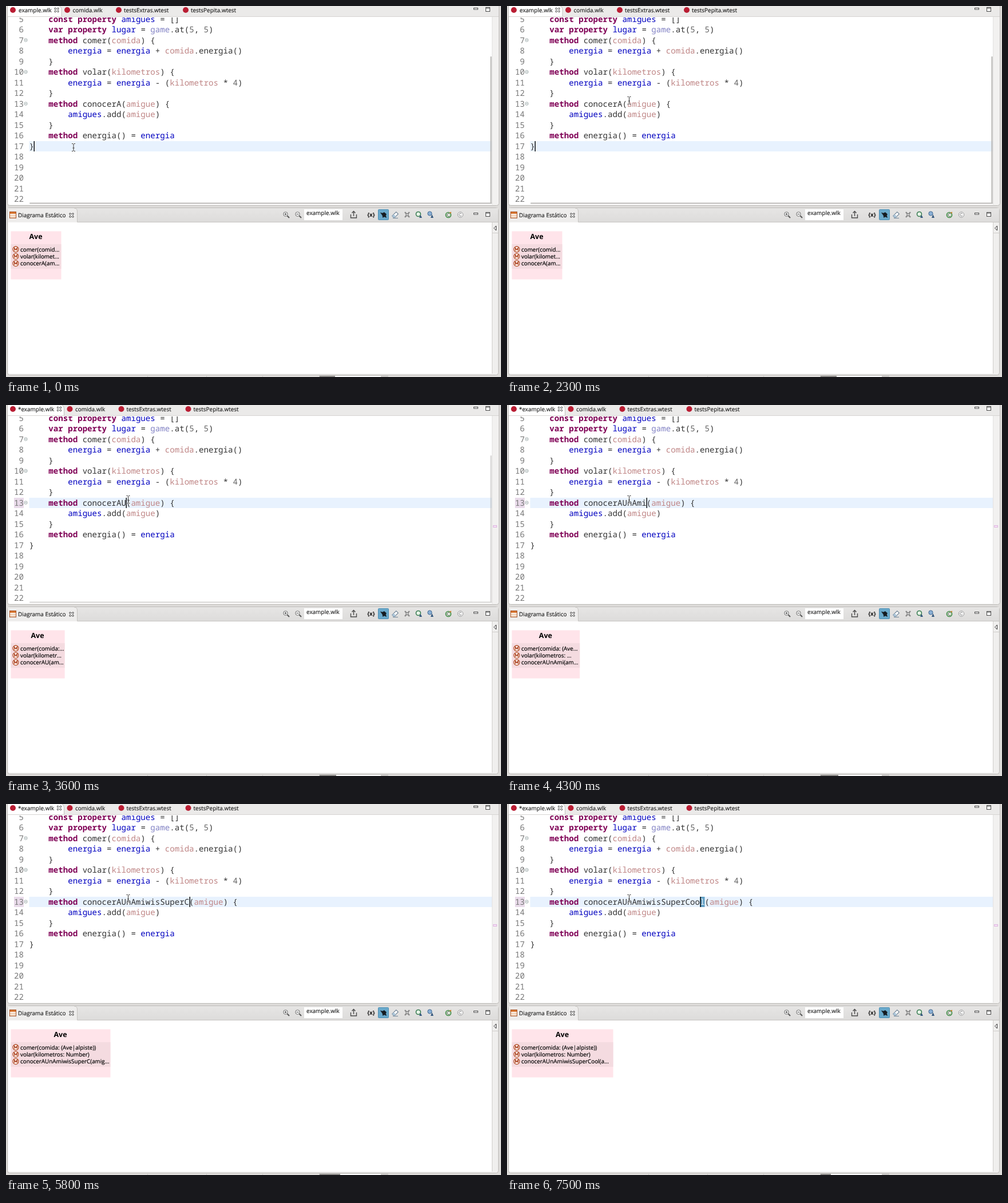
Recreate the animation shown at these times as an HTML page. Size 865 by 648 pixels, loop 8000 ms.

```html
<!DOCTYPE html>
<html lang="es">
<head>
<meta charset="utf-8">
<title>Editor</title>
<style>
  html, body { margin: 0; width: 100%; height: 100%; overflow: hidden; background: #dfdddb; }
  svg { display: block; width: 865px; height: 648px; }
  text { white-space: pre; text-rendering: geometricPrecision; }
  .code { font: 14.13px "Noto Sans Mono", "DejaVu Sans Mono", monospace; fill: #333; }
  .ui { font: 9.95px "Open Sans", "Noto Sans", sans-serif; fill: #1c1c1c; stroke: #1c1c1c; stroke-width: .15; }
  .ui circle { stroke: none; }
  .row { font: 9.85px "Open Sans", "Noto Sans", sans-serif; fill: #000; stroke: #000; stroke-width: .2; }
  .bold { font-weight: 700; stroke: none; }
  .kw { fill: #7f0055; font-weight: 700; }
  .field { fill: #0000c0; }
  .param { fill: #bf8585; }
  .obj { fill: #8282c4; }
  .num { fill: #666; }
  .ln { fill: #787878; text-anchor: end; }
  .line { fill: none; stroke: #4a4a4a; }
</style>
</head>
<body>
<svg viewBox="0 0 865 648">
  <defs>
    <clipPath id="page"><rect x="4" y="20" width="845" height="326"/></clipPath>
    <linearGradient id="bar" x2="0" y2="1"><stop stop-color="#e6e5e4"/><stop offset="1" stop-color="#dddcdb"/></linearGradient>
    <g id="close" class="line">
      <path d="M-3.5-3.5h2l1.5 2 1.5-2h2v2l-2 1.5 2 1.5v2h-2l-1.5-2-1.5 2h-2v-2l2-1.5-2-1.5z"/>
    </g>
    <g id="winBtns" class="line">
      <rect x="817.5" y="3.5" width="7" height="2.5" fill="#fff"/>
      <rect x="838.5" y="2.5" width="7" height="7" fill="#fff"/><path d="M838 4h8"/>
    </g>
    <g id="zoom">
      <path d="M2 2l3.5 3.5" stroke="#555" stroke-width="2"/>
      <circle cx="-1" cy="-1" r="3.7" fill="#fff" stroke="#666"/>
    </g>
    <g id="method">
      <circle r="5" fill="#fff4ee" stroke="#b4512c" stroke-width="1.3"/>
      <path d="M-2.4 2.6v-5l2.4 3.2 2.4-3.2v5" fill="none" stroke="#a83c1c" stroke-width="1.3"/>
    </g>
    <path id="beam" d="M-3-6.5h2l1 1 1-1h2M0-5.5V5.5M-3 6.5h2l1-1 1 1h2M-1.5 1h3"/>
  </defs>

  <!-- editor -->
  <rect x="2.5" y="-6" width="859" height="354.5" rx="4" fill="#f2f1f0" stroke="#bdbbb8"/>
  <rect x="3" y="0" width="858" height="18" fill="#ebeae9"/>
  <path id="tab" fill="#fff"/>
  <path id="tabEdge" fill="none" stroke="#c2c0bd"/>
  <path d="M3 18.5H861" stroke="#d6d4d2"/>
  <rect x="4" y="19" width="845" height="328" fill="#fff"/>
  <path d="M849.5 19V347" stroke="#e3e2e1"/>
  <circle cx="12" cy="7" r="5" fill="#b91d33"/>
  <text id="title" class="ui" y="10.5"></text>
  <use id="tabClose" href="#close" y="7"/>
  <g id="tabs" class="ui">
    <circle cx="107" cy="7" r="5" fill="#b91d33"/><text x="116.5" y="10.5">comida.wlk</text>
    <circle cx="197" cy="7" r="5" fill="#b91d33"/><text x="206" y="10.5">testsExtras.wtest</text>
    <circle cx="314" cy="7" r="5" fill="#b91d33"/><text x="323" y="10.5">testsPepita.wtest</text>
  </g>
  <use href="#winBtns"/>
  <g clip-path="url(#page)">
    <rect id="current" x="40.5" width="808.5" height="18" fill="#e8f2fe"/>
    <rect id="changed" x="14" y="162" width="17" height="18" fill="#e9dbea"/>
    <g id="code" class="code"></g>
    <g id="pick" class="code">
      <rect x="337" y="162" width="8.5" height="18" fill="#5f9fc4"/>
      <text x="337.1" y="175.6" style="fill:#e8f2fa">l</text>
    </g>
    <rect id="caret" width="1.5" height="18" fill="#111"/>
  </g>
  <rect id="mark" x="851.5" y="210.5" width="6" height="3" fill="#f7e3f7" stroke="#ddb3df"/>
  <g id="scroll" fill="#bbb9b7">
    <rect x="41" y="343.4" width="808" height="2.2" rx="1.1"/>
    <rect x="846.4" y="88" width="2.2" height="257" rx="1.1"/>
  </g>
  <g id="mouse" fill="none">
    <use href="#beam" stroke="#fff" stroke-width="2.4" opacity=".7"/>
    <use href="#beam" stroke="#333"/>
  </g>

  <!-- diagram view -->
  <rect x="2.5" y="352.5" width="858" height="292" rx="4" fill="#f0efee" stroke="#bdbbb8"/>
  <rect x="3" y="353" width="857" height="24" fill="url(#bar)"/>
  <path d="M3 377V356q0-3 3-3H119q5 0 5.5 5V377z" fill="#eeedec"/>
  <path d="M119 353q5 0 5.5 5V377.5H860" fill="none" stroke="#c6c4c1"/>
  <rect x="4" y="378" width="846" height="264" fill="#fff"/>
  <path d="M849.5 378V642M850 396.5H860" stroke="#d0cecb"/>
  <path d="M856.5 384v8l-4-4z" fill="#fff" stroke="#333"/>
  <rect x="6.5" y="359.5" width="11" height="11" fill="#fff" stroke="#a8562a"/>
  <path d="M7 361.5h10" stroke="#d8752f" stroke-width="3"/>
  <path d="M7 365.5h10M7 368.5h10" stroke="#e09a60"/>
  <text class="ui" x="21" y="368.7">Diagrama Estático</text>
  <use href="#close" x="114.5" y="365.5"/>

  <use href="#zoom" x="489.5" y="364.5"/><path d="M486.5 363.5h4M488.5 361.5v4" stroke="#444"/>
  <use href="#zoom" x="510.5" y="364.5"/><path d="M507.5 363.5h4" stroke="#444"/>
  <rect x="521" y="355" width="67" height="19" fill="#fff"/>
  <text class="ui" x="525" y="365">example.wlk</text>
  <path d="M602.5 364v6h10v-6M607.5 367v-8M604.5 361.5l3-3 3 3" class="line" stroke-width="1.4"/>
  <text class="ui bold" x="638" y="368" text-anchor="middle">{x}</text>
  <rect x="650.5" y="355.5" width="18" height="18" rx="1" fill="#69a9cb" stroke="#4f8fb2"/>
  <path d="M654.5 361l3 1 3.5-1.5 3.5 3-1 2.5 1 3.5-3.500-1.500-2.500 1.500-.5-3.500z" fill="#151b20" stroke="#151b20" stroke-width=".6"/>
  <g transform="translate(680 365) rotate(-45)">
    <rect x="-5" y="-2.5" width="10" height="5" fill="#fff" stroke="#63798d"/>
    <rect x="-5" y="-2.5" width="4" height="5" fill="#aac4d8"/>
  </g>
  <path d="M676 370.5h9" stroke="#70869a"/>
  <path d="M697 360l8 9M705 360l-8 9" stroke="#888" stroke-width="2.4"/><circle cx="701" cy="364.5" r="2" fill="#ddd" stroke="#777"/>
  <circle cx="720.5" cy="363.5" r="4" fill="#e8f4e8" stroke="#3a7c53" stroke-width="1.6"/><path d="M722 370l2.5-5 2.5 5z" fill="#35567d"/>
  <circle cx="740.5" cy="362.5" r="3.6" fill="#8bb0d5" stroke="#3e6792"/><path d="M742 370l2.5-6 2.5 6z" fill="#34577d"/>
  <circle cx="773" cy="365" r="4.5" fill="#e9f5e6" stroke="#3f8b45" stroke-width="1.7"/>
  <path d="M775.5 363.5a2.6 2.6 0 1 0 0 3" class="line"/><path d="M774 361l4-1.5v3" fill="#c9802e"/>
  <circle cx="794" cy="364.5" r="4.7" fill="#f6f6f6" stroke="#999"/><path d="M796 363a2.4 2.4 0 1 0 0 3" fill="none" stroke="#888"/>
  <use href="#winBtns" y="358"/>

  <rect id="box" x="8.5" y="393.5" height="84" fill="#ffe4ea"/>
  <rect id="band" x="8.5" y="416" height="43" fill="#f4dbe0"/>
  <text id="name" class="row bold" y="407" text-anchor="middle" style="font-size:12.5px">Ave</text>
  <use href="#method" x="17" y="425"/><use href="#method" x="17" y="437.3"/><use href="#method" x="17" y="449.6"/>
  <g id="rows" class="row"><text x="25" y="428.6"/><text x="25" y="440.9"/><text x="25" y="453.2"/></g>

  <!-- status strip -->
  <path d="M247.5 646v2M350.5 646v2M448.5 646v2" stroke="#c8c6c3"/>
  <rect x="547" y="645.5" width="121" height="3" fill="#c8c6c4"/>
  <rect x="548" y="646" width="107" height="2" fill="#fafafa"/>
  <rect id="heap" x="548" y="646" height="2" fill="#8b8987"/>
</svg>
<script>
const $ = id => document.getElementById(id);
const set = (el, attrs) => { for (const k in attrs) el.setAttribute(k, attrs[k]); };
const show = (id, on) => { $(id).style.display = on ? '' : 'none'; };
const clamp = v => Math.min(1, Math.max(0, v));

const LOOP = 8000, COL = 8.478, LEFT = 40.4, PITCH = 18.5;
const lineTop = n => 162 + (n - 13) * PITCH;
const colX = c => LEFT + c * COL;

const source = [
  '    const property amigues = []',
  '    var property lugar = game.at(5, 5)',
  '    method comer(comida) {',
  '        energia = energia + comida.energia()',
  '    }',
  '    method volar(kilometros) {',
  '        energia = energia - (kilometros * 4)',
  '    }',
  '    method conocerA(amigue) {',
  '        amigues.add(amigue)',
  '    }',
  '    method energia() = energia',
  '}'
];
const kinds = {
  kw: ['const', 'var', 'property', 'method'],
  field: ['energia', 'amigues', 'lugar'],
  param: ['comida', 'kilometros', 'amigue'],
  obj: ['game'], num: ['5', '4']
};

function paint(line) {
  const parts = line.split(/(\w+)/);
  return parts.map((word, i) => {
    const kind = Object.keys(kinds).find(k => kinds[k].includes(word));
    const call = word === 'energia' && parts[i + 1].startsWith('(');
    return kind && !call ? `<tspan class="${kind}">${word}</tspan>` : word;
  }).join('');
}

let html = '';
for (let n = 5; n <= 22; n++) {
  const y = lineTop(n) + 13.6;
  html += `<text class="ln" x="31" y="${y}">${n}</text>`;
  if (n <= 17) html += `<text id="l${n}" x="${LEFT}" y="${y}">${paint(source[n - 5])}</text>`;
  if ([7, 10, 13].includes(n))
    html += `<g stroke="#899" stroke-width=".8" transform="translate(34.5 ${y - 5})"><circle r="2.7" fill="#fff"/><path d="M-1.5 0h3"/></g>`;
}
$('code').innerHTML = html;

// Typed suffix and the time of each key
const suffix = 'UnAmiwisSuperCool';
const keys = [3500, 3800, 4100, 4200, 4300, 4700, 4800, 4900, 5200, 5300,
              5500, 5600, 5600, 5800, 5900, 6100, 6600];
const heapSteps = [[0, 575], [1300, 576], [3500, 577], [4200, 579], [4500, 581],
                   [5100, 582], [5500, 584], [6100, 566]];
const caretOff = [[100, 700], [1200, 1800], [7200, 7500]];

const cut = (s, n) => n >= s.length ? s : s.slice(0, Math.floor(n)) + '...';
const rows = $('rows').children;

function drawText(n) {
  const method = 'conocerA' + suffix.slice(0, n);
  $('l13').innerHTML = paint(`    method ${method}(amigue) {`);
  const w = Math.min(177, 88 + 6.14 * n);
  set($('box'), { width: w });
  set($('band'), { width: w });
  set($('name'), { x: 8 + w / 2 });
  const arg = n > 14 ? 18 - n : 2 + Math.floor(n / 7);
  rows[0].textContent = cut('comer(comida: (Ave|alpiste))', 11.6 + 1.43 * n);
  rows[1].textContent = cut('volar(kilometros: Number)', 13 + 1.15 * n);
  rows[2].textContent = `${method}(${'amigue'.slice(0, arg)}...`;

  const dirty = n > 0, end = dirty ? 102.5 : 98;
  $('title').textContent = (dirty ? '*' : '') + 'example.wlk';
  set($('title'), { x: dirty ? 21 : 22 });
  set($('tabClose'), { x: dirty ? 93 : 88.5 });
  set($('tabs'), { transform: `translate(${dirty ? 4.5 : 0})` });
  set($('tab'), { d: `M3 19V0H${end - 5}q4 1 4 6V19z` });
  set($('tabEdge'), { d: `M${end - 5} 0q4 1 4 6V18` });
  show('changed', dirty);
  show('mark', dirty);
}

let typed = -1;
function draw(t) {
  const n = keys.filter(k => k <= t).length;
  if (n !== typed) drawText(typed = n);

  const clicked = t >= 2800, picked = t >= 7500;
  const top = clicked ? 162 : 236;
  const col = clicked ? 19 + n - (picked ? 1 : 0) : 1;
  set($('current'), { y: top });
  set($('caret'), { x: Math.floor(colX(col)) + 0.5, y: top });
  show('caret', !caretOff.some(([a, b]) => t >= a && t < b));
  show('pick', picked);

  const step = Math.floor(t / 100);
  const p = clamp((step - 9) / 14), e = p * p * (3 - 2 * p);
  set($('mouse'), { transform: `translate(${118 + 95.5 * e} ${247 - 82 * e})` });
  set($('scroll'), { opacity: 1 - clamp((step - 34) / 5) });

  const heap = heapSteps.filter(s => s[0] <= t).pop()[1];
  set($('heap'), { width: heap - 548 });
}

const start = performance.now();
function tick() {
  draw((performance.now() - start) % LOOP);
  requestAnimationFrame(tick);
}
tick();
</script>
</body>
</html>
```
